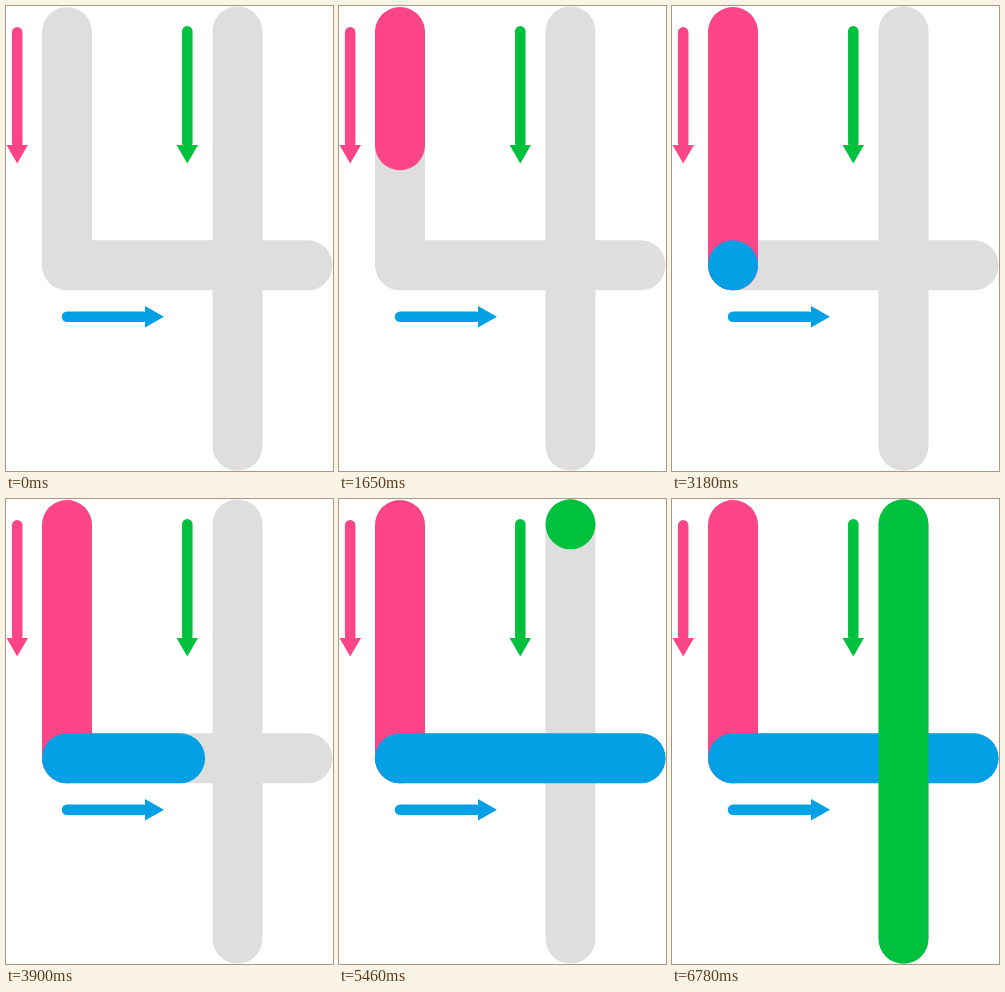
Write an HTML page that moves like this. It is 327 by 465 pixels and loops after 8000 ms.

```html
<!DOCTYPE html>
<html lang="en">
<head>
<meta charset="utf-8">
<title>Writing the digit 4</title>
<style>
  html, body { margin: 0; width: 100%; height: 100%; overflow: hidden; background: #fff; }
  svg { display: block; width: 327px; height: 465px; }
  path { fill: none; stroke-linecap: round; stroke-width: 50; }
  .arrow path { stroke-width: 10.5; }
  .arrow polygon { stroke: none; }
</style>
</head>
<body>
<svg viewBox="0 0 327 465">
  <path stroke="#dedede" d="M61 26V259.3M61 259.3H301.6M231.5 25.3V439.7"/>
  <g id="strokes"></g>
  <g class="arrow" stroke="#fc4587" fill="#fc4587">
    <path d="M11.2 26.3V137"/><polygon points="0.5,139 22,139 11.2,157.5"/>
  </g>
  <g class="arrow" stroke="#03a0e6" fill="#03a0e6">
    <path d="M61 310.8H137"/><polygon points="139,300 139,321.6 158,310.8"/>
  </g>
  <g class="arrow" stroke="#00c13d" fill="#00c13d">
    <path d="M181.3 25.3V137"/><polygon points="170.6,139 192,139 181.3,157.5"/>
  </g>
</svg>
<script>
const LOOP = 8000, DRAW = 1500;

// reach: eased progress at which the stroke is already complete
const strokes = [
  { color: '#fc4587', x: 61, y: 26, dir: 'V', to: 259.3, start: 922, reach: 0.973 },
  { color: '#03a0e6', x: 61, y: 259.3, dir: 'H', to: 301.6, start: 3180, reach: 0.983 },
  { color: '#00c13d', x: 231.5, y: 25.3, dir: 'V', to: 439.7, start: 5452, reach: 0.972 }
];

const group = document.getElementById('strokes');
for (const s of strokes) {
  s.path = document.createElementNS('http://www.w3.org/2000/svg', 'path');
  s.path.setAttribute('stroke', s.color);
  group.append(s.path);
}

const easeInOut = u => u < 0.5 ? 2 * u * u : 1 - 2 * (1 - u) ** 2;

function render(time) {
  const t = time % LOOP;
  for (const s of strokes) {
    const u = Math.min(1, (t - s.start) / DRAW);
    s.path.style.display = u < 0 ? 'none' : '';
    if (u < 0) continue;
    const from = s.dir === 'V' ? s.y : s.x;
    const done = Math.min(1, easeInOut(u) / s.reach);
    const end = from + (s.to - from) * done + 0.01;
    s.path.setAttribute('d', `M${s.x} ${s.y}${s.dir}${end}`);
  }
}

const origin = performance.now();
function tick() {
  render(performance.now() - origin);
  requestAnimationFrame(tick);
}
tick();
</script>
</body>
</html>
```
